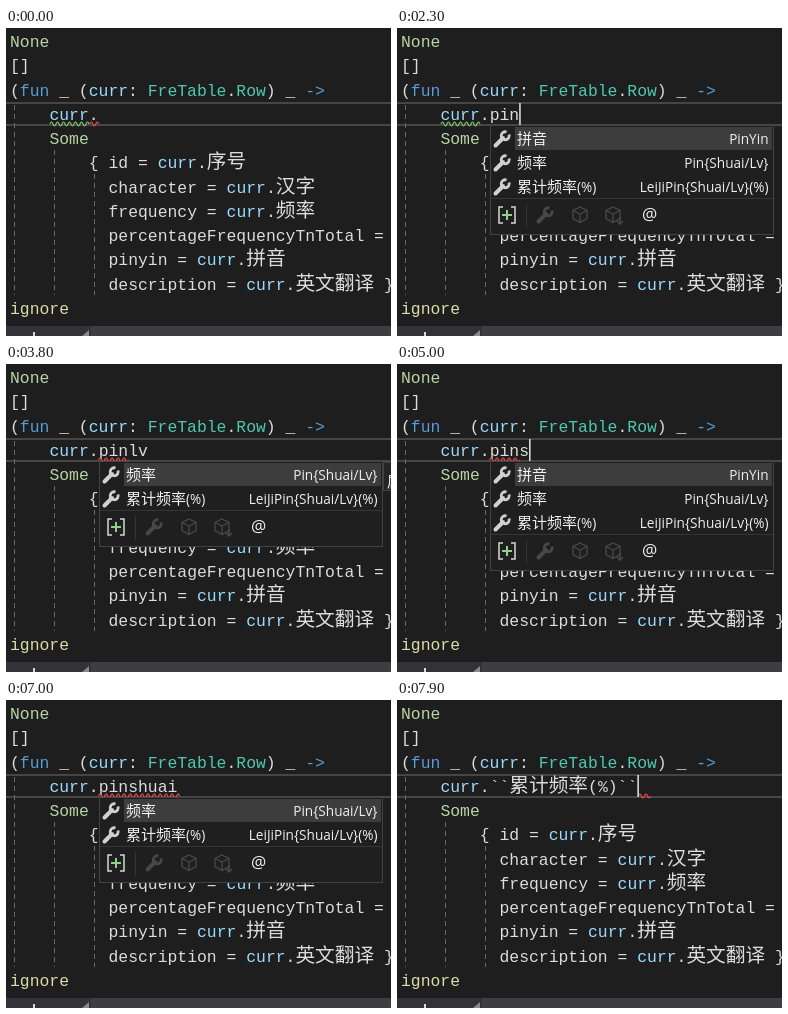
Recreate the animation shown at these times as an HTML page. Size 385x308 px, loop 8 s.

```html
<!DOCTYPE html>
<html lang="en">
<head>
<meta charset="utf-8">
<title>Code completion by pinyin</title>
<style>
  html, body { margin: 0; width: 100%; height: 100%; overflow: hidden; background: #1e1e1e; }
  svg { display: block; }
  text { white-space: pre; }
  .code text { font: 16.4px "Liberation Mono", monospace; }
  .code .han { font: 300 19.7px "Noto Sans CJK SC", "Noto Sans CJK", sans-serif; }
  .ui text { font: 13.6px "Open Sans", "Noto Sans", sans-serif; fill: #f0f0f0; }
  .ui .han { font: 15px "Noto Sans CJK SC", "Noto Sans CJK", sans-serif; }
  .plain { fill: #dcdcdc; }
  .key { fill: #569cd6; }
  .type { fill: #4ec9b0; }
  .union { fill: #b8d7a3; }
  .func { fill: #dcdcaa; }
  .var { fill: #9cdcfe; }
</style>
</head>
<body>
<svg id="stage" width="385" height="308" viewBox="0 0 385 308"></svg>
<script>
const LOOP = 8000, CELL = 9.85, ROW = 24.25;
const HAN = /([\u4e00-\u9fff]+)/;
const colX = col => 4 + col * CELL;
const baseY = row => 19 + row * ROW;

function add(parent, tag, attrs = {}, text) {
  const el = document.createElementNS('http://www.w3.org/2000/svg', tag);
  for (const k in attrs) el.setAttribute(k, attrs[k]);
  if (text !== undefined) el.textContent = text;
  parent.append(el);
  return el;
}

// Chinese runs get their own font and always fill two cells per character.
function spans(el, text, cls) {
  for (const run of text.split(HAN)) {
    if (run) add(el, 'tspan', { class: HAN.test(run) ? cls + ' han' : cls }, run);
  }
}

function codeLine(parent, row, col, parts) {
  const el = add(parent, 'text', { x: colX(col), y: baseY(row) });
  for (const [text, cls = 'plain'] of parts) spans(el, text, cls);
  return el;
}

const cells = text => [...text].reduce((n, ch) => n + (HAN.test(ch) ? 2 : 1), 0);

function wave(x0, x1) {
  let d = `M${x0} 96`;
  for (let x = x0, up = true; x < x1; x += 3, up = !up) d += `q1.5 ${up ? -4 : 4} 3 0`;
  return d;
}

function wrench(parent, x, y, color) {
  const g = add(parent, 'g', { transform: `translate(${x} ${y})`, fill: 'none', stroke: color });
  add(g, 'path', { d: 'M-6.5 6.5L1 -1', 'stroke-width': 4, 'stroke-linecap': 'round' });
  add(g, 'path', { d: 'M4.5 -7A4 4 0 1 0 7 -4.5', 'stroke-width': 2.8 });
}

function cube(parent, x, y, color) {
  add(parent, 'path', {
    d: `M${x} ${y - 8}l7 3.5v8l-7 4l-7 -4v-8zM${x - 7} ${y - 4.5}l7 3.5l7 -3.5M${x} ${y - 1}v8.5`,
    fill: 'none', stroke: color, 'stroke-width': 1.3
  });
}

const stage = document.getElementById('stage');
add(stage, 'rect', { width: 385, height: 308, fill: '#1e1e1e' });

// Current line frame and indent guides
for (const y of [74, 96]) add(stage, 'rect', { y, width: 385, height: 2, fill: '#464646' });
[[8.5, 77], [48.5, 122], [88.5, 146]].forEach(([x, y]) =>
  add(stage, 'path', { d: `M${x} ${y}V267`, stroke: '#686868', 'stroke-dasharray': '5 4' }));

const code = add(stage, 'g', { class: 'code' });
const field = (name, column, tail = '') => [[name + ' = '], ['curr', 'var'], ['.' + column + tail]];
codeLine(code, 0, 0, [['None', 'union']]);
codeLine(code, 1, 0, [['[]']]);
codeLine(code, 2, 0, [['('], ['fun', 'key'], [' _ ('], ['curr', 'var'], [': '], ['FreTable', 'type'],
  ['.'], ['Row', 'type'], [') _ '], ['->', 'key']]);
codeLine(code, 3, 4, [['curr', 'var']]);
const member = codeLine(code, 3, 8, []);
codeLine(code, 4, 4, [['Some', 'union']]);
codeLine(code, 5, 8, field('{ id', '序号'));
codeLine(code, 6, 10, field('character', '汉字'));
codeLine(code, 7, 10, field('frequency', '频率'));
codeLine(code, 8, 10, [['percentageFrequencyTnTotal =']]);
codeLine(code, 9, 10, field('pinyin', '拼音'));
codeLine(code, 10, 10, field('description', '英文翻译', ' }'));
codeLine(code, 11, 0, [['ignore', 'func']]);

const green = add(stage, 'path', { d: wave(44, 81), fill: 'none', stroke: '#7cc36c', 'stroke-width': 1.2 });
const red = add(stage, 'path', { fill: 'none', stroke: '#f04a4a', 'stroke-width': 1.2 });
const caret = add(stage, 'rect', { y: 75, width: 1.5, height: 22, fill: '#e4e4e4' });

// Bottom strip
add(stage, 'rect', { y: 298, width: 385, height: 10, fill: '#3e3e42' });
add(stage, 'rect', { y: 298, width: 85, height: 10, fill: '#333337' });
add(stage, 'rect', { x: 27, y: 304, width: 2, height: 4, fill: '#d8d8d8' });
add(stage, 'path', { d: 'M83 302v6h-7z', fill: '#8a8a8a' });

const popup = add(stage, 'g', { class: 'ui' });
const tip = add(stage, 'g', { class: 'ui' });
add(tip, 'rect', { x: 377.5, y: 98.5, width: 20, height: 28, fill: '#252526', stroke: '#424245' });
add(tip, 'text', { x: 381, y: 123, class: 'han' }, '属');

const items = [
  ['拼音', 'PinYin'], ['频率', 'Pin{Shuai/Lv}'], ['累计频率(%)', 'LeiJiPin{Shuai/Lv}(%)'],
  ['序号', 'XuHao'], ['汉字', 'HanZi'], ['英文翻译', 'YingWenFanYi'],
  ['Equals', ''], ['GetHashCode', ''], ['GetType', '']
];
const ALL = [0, 9], PIN = [0, 3], RATE = [1, 3];

function drawPopup(list, pick) {
  popup.replaceChildren();
  if (!list) return;
  const rows = items.slice(...list), h = 38 + 24 * rows.length;
  add(popup, 'rect', { x: 93.5, y: 97.5, width: 283, height: h - 1, fill: '#1f1f1f', stroke: '#424245' });
  rows.forEach(([name, hint], i) => {
    const y = 99 + 24 * i;
    if (i === pick) add(popup, 'rect', { x: 118, y, width: 257, height: 23, fill: '#3d3d3d' });
    wrench(popup, 105, y + 12, '#d0d0d0');
    spans(add(popup, 'text', { x: 120, y: y + 17 }), name, '');
    add(popup, 'text', { x: 371.5, y: y + 17, 'text-anchor': 'end' }, hint);
  });
  const y = 97 + h - 20, dim = '#484848';
  add(popup, 'path', { d: `M94 ${y - 16.5}H376M129.5 ${y - 11}v24`, stroke: '#353535' });
  add(popup, 'path', {
    d: `M106 ${y - 8}h-4v16h4M114 ${y - 8}h4v16h-4`, fill: 'none', stroke: '#d8d8d8', 'stroke-width': 1.5
  });
  add(popup, 'path', { d: `M105 ${y}h10M110 ${y - 5}v10`, stroke: '#8fd18a', 'stroke-width': 2 });
  wrench(popup, 148, y, dim);
  cube(popup, 183, y, dim);
  cube(popup, 216, y, dim);
  add(popup, 'path', { d: `M223 ${y + 2}v7m-3 -3l3 3l3 -3`, fill: 'none', stroke: dim, 'stroke-width': 1.5 });
  add(popup, 'text', { x: 245, y: y + 5, style: 'font-size:17px' }, '@');
}

// Each step changes part of the state; `red` is a span in columns.
const steps = [
  [0, { typed: '', caret: 0, green: 1, red: [8.1, 9], list: null, pick: 0, tip: 0 }],
  [800, { caret: 1 }],
  [1300, { caret: 0 }],
  [1700, { typed: 'p', caret: 1 }],
  [2000, { red: null }],
  [2100, { typed: 'pi', list: ALL }],
  [2300, { typed: 'pin', list: PIN }],
  [2400, { green: 0, red: [9, 12] }],
  [2700, { typed: 'pinl' }],
  [2800, { list: RATE }],
  [2900, { tip: 1 }],
  [3200, { typed: 'pinlv', tip: 0 }],
  [3300, { tip: 1 }],
  [3800, { caret: 0 }],
  [4300, { caret: 1 }],
  [4500, { typed: 'pinl' }],
  [4700, { typed: 'pin', tip: 0 }],
  [4800, { list: PIN }],
  [5000, { typed: 'pins' }],
  [5100, { typed: 'pinsh', list: RATE }],
  [5200, { typed: 'pinshu' }],
  [5400, { typed: 'pinshua' }],
  [5600, { typed: 'pinshuai', tip: 1 }],
  [6000, { caret: 0 }],
  [6400, { red: [9, 17] }],
  [6500, { caret: 1 }],
  [7000, { caret: 0, tip: 0 }],
  [7100, { pick: 1 }],
  [7400, { pick: 0 }],
  [7500, { caret: 1 }],
  [7700, { pick: 1 }],
  [7900, { typed: '``累计频率(%)``', list: null, red: [24.1, 25.1] }]
];

let shown = -1;
function show(index) {
  if (index === shown) return;
  shown = index;
  const s = Object.assign({}, ...steps.slice(0, index + 1).map(step => step[1]));
  const visible = (el, on) => el.setAttribute('visibility', on ? 'visible' : 'hidden');
  member.replaceChildren();
  spans(member, '.' + s.typed, 'plain');
  caret.setAttribute('x', colX(9 + cells(s.typed)));
  red.setAttribute('d', s.red ? wave(...s.red.map(colX)) : '');
  visible(caret, s.caret);
  visible(green, s.green);
  visible(tip, s.tip);
  drawPopup(s.list, s.pick);
}

const start = performance.now();
function tick() {
  const t = (performance.now() - start) % LOOP;
  show(steps.findLastIndex(step => step[0] <= t));
  requestAnimationFrame(tick);
}
tick();
</script>
</body>
</html>
```
